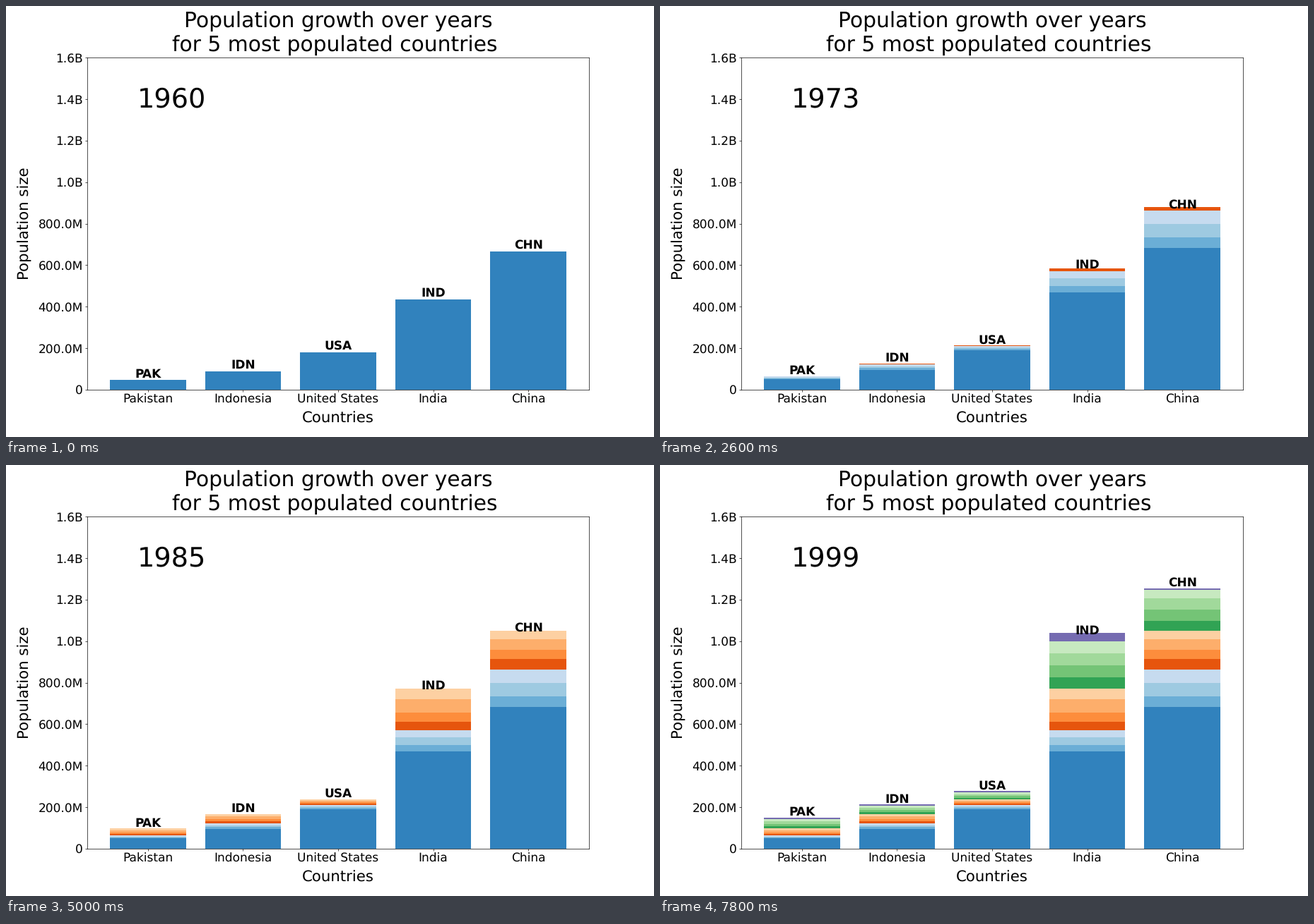
Recreate the animation shown at these times as a matplotlib script. Size 917 by 611 pixels, loop 8000 ms.

```python
import numpy as np
import matplotlib.pyplot as plt
from matplotlib.animation import FuncAnimation

W, H, DPI = 917, 611, 64
K = 61.13 / DPI          # scale applied to point sizes
START, COUNT, SPAN = 1960, 40, 63

plt.rcParams.update({
    "font.family": "DejaVu Sans",
    "text.hinting": "no_hinting",
    "axes.linewidth": 0.8 * K,
    "axes.labelpad": 10 * K,
    "axes.labelsize": 25 * K,
    "axes.titlesize": 35 * K,
    "axes.titlepad": 10 * K,
})
for axis in ("xtick", "ytick"):
    plt.rcParams.update({
        f"{axis}.labelsize": 20 * K,
        f"{axis}.major.size": 3.5 * K,
        f"{axis}.major.width": 0.8 * K,
        f"{axis}.major.pad": 3.5 * K,
    })

# Millions of people in a few key years, joined by a smooth curve
KEY_YEARS = np.array([1960, 1963, 1972, 1982, 1991, 1999])
COUNTRIES = {
    "Pakistan": ("PAK", [46, 49, 63, 87, 119, 150]),
    "Indonesia": ("IDN", [88, 96, 122, 156, 187, 213]),
    "United States": ("USA", [181, 189, 210, 232, 253, 279]),
    "India": ("IND", [436, 468, 572, 720, 884, 1039]),
    "China": ("CHN", [667, 682, 862, 1009, 1151, 1253]),
}
codes, keys = zip(*COUNTRIES.values())
xs = np.arange(len(codes))


def curve(values):
    t = (KEY_YEARS - START) / COUNT
    fit = np.polyfit(t, values, len(t) - 1)
    return np.polyval(fit, np.arange(COUNT) / COUNT) * 1e6


pop = np.array([curve(v) for v in keys])
peak = np.maximum.accumulate(pop, axis=1)
band = np.arange(COUNT) * 20 // SPAN      # colour index of each year


def short(value, _):
    if value == 0:
        return "0"
    return f"{value / 1e9:.1f}B" if value >= 1e9 else f"{value / 1e6:.1f}M"


fig, ax = plt.subplots(figsize=(W / DPI, H / DPI), dpi=DPI)
fig.subplots_adjust(left=0.125, right=0.9, bottom=0.11, top=0.88)
palette = plt.get_cmap("tab20c").colors

# Later bands sit behind earlier ones, so only their growth shows
stacks = [ax.bar(xs, 0 * xs, 0.8, color=palette[b], zorder=2 - 0.05 * b)
          for b in range(band[-1] + 1)]
tags = [ax.text(x, 0, code, size=20 * K, weight="bold", ha="center",
                va="bottom", zorder=5)
        for x, code in zip(xs, codes)]
year_text = ax.text(0.1, 0.85, "", size=45 * K, transform=ax.transAxes, zorder=5)

ax.set_xlim(-0.64, 4.64)
ax.set_ylim(0, 1.6e9)
ax.set_xticks(xs, COUNTRIES)
ax.set_yticks(np.arange(9) * 2e8)
ax.yaxis.set_major_formatter(short)
ax.set_xlabel("Countries")
ax.set_ylabel("Population size")
ax.set_title("Population growth over years\nfor 5 most populated countries ")


def update(i):
    for b, bars in enumerate(stacks):
        last = min(i, np.flatnonzero(band == b)[-1])
        for rect, series in zip(bars, peak):
            rect.set_height(series[last] if band[i] >= b else 0)
    # Tags trail the bars by one year
    for x, tag in zip(xs, tags):
        tag.set_position((x, pop[x, max(i - 1, 0)]))
    year_text.set_text(str(START + i))
    return []


anim = FuncAnimation(fig, update, frames=COUNT, interval=200,
                     init_func=lambda: update(0), repeat=True, repeat_delay=0)
plt.show()
```
